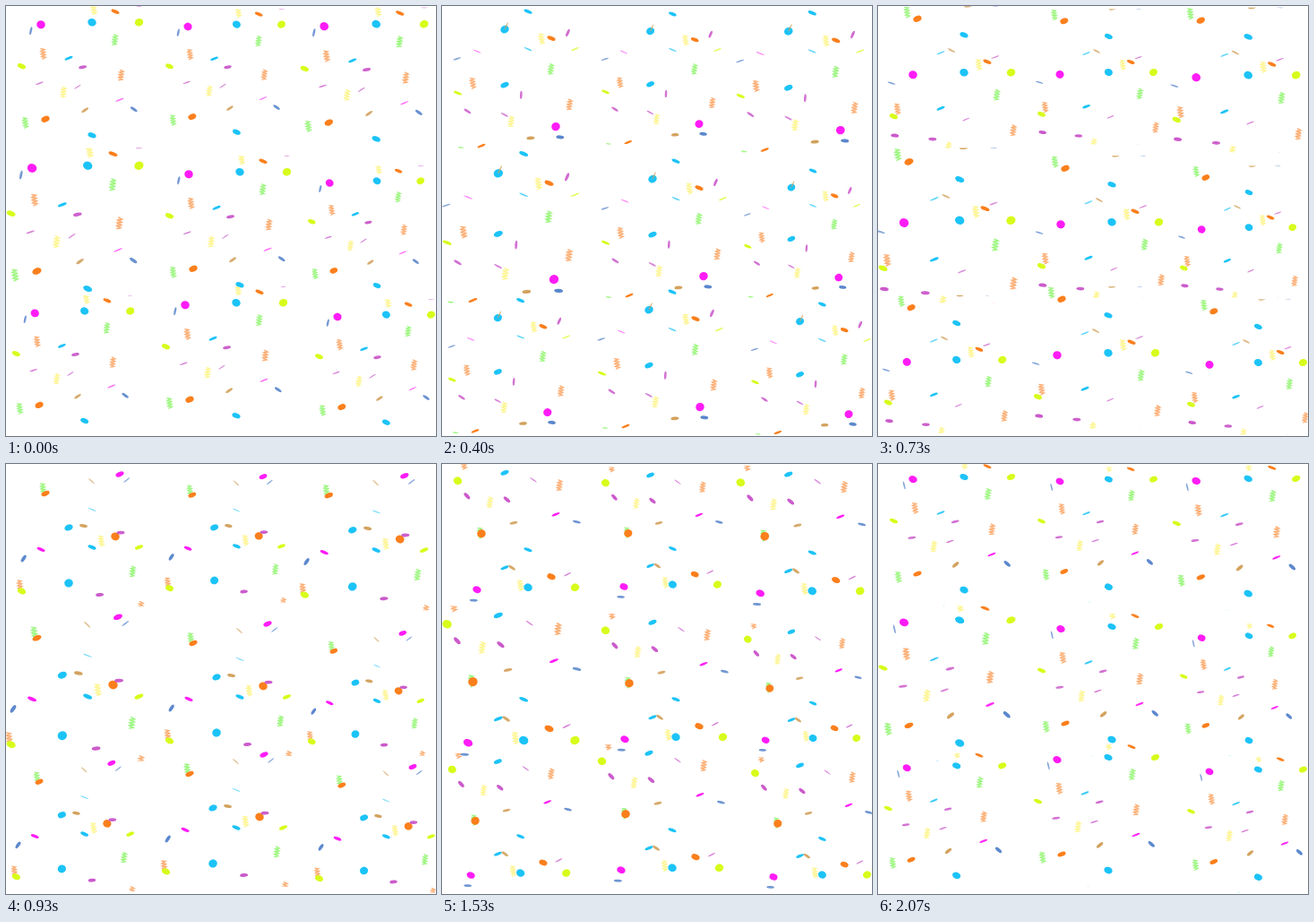
Animation, 480 px wide and 480 px high, one loop 2.14 s. Source, as an HTML page with a canvas:

```html
<!DOCTYPE html>
<html lang="en">
<head>
<meta charset="utf-8">
<title>Confetti</title>
<style>
  html, body { margin: 0; width: 100%; height: 100%; overflow: hidden; background: #fff; }
  canvas { display: block; width: 480px; height: 480px; }
</style>
</head>
<body>
<canvas id="stage" width="480" height="480"></canvas>
<script>
const ctx = document.getElementById('stage').getContext('2d');
const LOOP = 2140, STEPS = 45;
const MID_X = 83, TILE_H = 158.5;
const RAD = Math.PI / 180;

const MAGENTA = '#ff1cf7', CYAN = '#1cc3f7', ORANGE = '#fb7f1c', LIME = '#d8fb1c';
const BLUE = '#5a86cc', TAN = '#d2a05a', ORCHID = '#cb5acb';
const GREEN = '#93f574', PEACH = '#fba768', YELLOW = '#fdf48a';

// Centre and scale of each copy of the shower
const tiles = [
  [83, 79.5, 1], [245, 79, .954], [400, 82.5, 1.018],
  [77, 245, 1.09], [248, 246.5, 1], [402, 252, .927],
  [75, 400, .972], [244, 392.5, 1], [412, 403, .954]
];

// Every pose follows from the height alone; span is the drop per loop.
const wave = (y, peak, length) => Math.cos((y - peak) / length * 2 * Math.PI);

const dot = {
  span: 168,
  sway: () => 0,
  draw(color, y, side) {
    const c = Math.abs(wave(y, 22, 112));
    const face = (c + c ** 8) / 2;
    ctx.rotate(side * 22 * RAD);
    ctx.globalAlpha = Math.min(1, .5 + face * 3);
    oval(color, 4.8, .6 + 4 * face);
  }
};

const flake = {
  span: 175,
  sway: y => 11 * wave(y, 77, 175),
  draw(color, y, side) {
    const turn = Math.atan(3 * Math.tan((y - 23) / 73 * Math.PI));
    const face = (1 - wave(y, 19.5, 35.5)) / 2;
    ctx.rotate(side * (-72 * RAD - turn));
    ctx.globalAlpha = .7 + .3 * face;
    oval(color, 4.5, .7 + 1.3 * face);
  }
};

const ribbon = {
  span: 185,
  sway: y => 13.5 * wave(y, 54, 185),
  draw(color, y, side) {
    const folds = 8, h = 12;
    ctx.rotate(-side * 9 * RAD);
    ctx.globalAlpha = .4;
    oval(color, 2.7, h / 2);
    ctx.globalAlpha = .9;
    ctx.strokeStyle = color;
    ctx.lineWidth = 1.2;
    ctx.beginPath();
    for (let i = 0; i <= folds; i++) {
      ctx.lineTo(i % 2 ? 2.3 : -2.3, (i / folds - .5) * h);
    }
    ctx.stroke();
  }
};

const pieces = [];

// Two mirrored columns, by default half a drop apart
function pair(kind, color, arm, side, left, right = left + kind.span / 2) {
  pieces.push({ kind, color, x: MID_X - arm, y: left, side });
  pieces.push({ kind, color, x: MID_X + arm, y: right, side: -side });
}

pair(ribbon, GREEN, 50, 1, 130);
pair(ribbon, PEACH, 55, 1, 53, 77);
pair(ribbon, YELLOW, 17, -1, 96);
pair(dot, MAGENTA, 44, 1, 20.5);
pair(dot, CYAN, 13, -1, 58, 18);
pair(dot, CYAN, 13, -1, -4, 144);
pair(dot, ORANGE, 39, -1, 126, 6);
pair(dot, LIME, 65.5, 1, 67, 18);
pair(flake, BLUE, 57.5, -1, 27.5);
pair(flake, TAN, 7, 1, -9, 116);
pair(flake, ORCHID, 13, 1, 90, 68);
pair(flake, ORCHID, 56, 1, 86);

function oval(color, rx, ry) {
  ctx.fillStyle = color;
  ctx.beginPath();
  ctx.ellipse(0, 0, rx, ry, 0, 0, 2 * Math.PI);
  ctx.fill();
}

function drawPiece({ kind, color, x, y, side }, step) {
  const { span } = kind;
  const top = (TILE_H - span) / 2;
  const drop = y + span * step / STEPS - top;
  const now = top + (drop + span) % span;
  ctx.save();
  ctx.translate(x + side * kind.sway(now), now);
  kind.draw(color, now, side);
  ctx.restore();
}

// 15 pictures a second, each held on a 10 ms grid
function stepAt(t) {
  const rest = t % 200;
  const n = Math.floor(t / 200) * 3 + (rest >= 130 ? 2 : rest >= 70 ? 1 : 0);
  return Math.round(Math.min(n, 31) * STEPS / 32);
}

function render(step) {
  ctx.fillStyle = '#fff';
  ctx.fillRect(0, 0, 480, 480);
  for (const [x, y, scale] of tiles) {
    ctx.save();
    ctx.translate(x, y);
    ctx.scale(scale, scale);
    ctx.translate(-MID_X, -TILE_H / 2);
    ctx.beginPath();
    ctx.rect(-20, 0, 220, TILE_H);
    ctx.clip();
    for (const p of pieces) drawPiece(p, step);
    ctx.restore();
  }
}

const start = performance.now();
function tick() {
  render(stepAt((performance.now() - start) % LOOP));
  requestAnimationFrame(tick);
}
tick();
</script>
</body>
</html>
```
